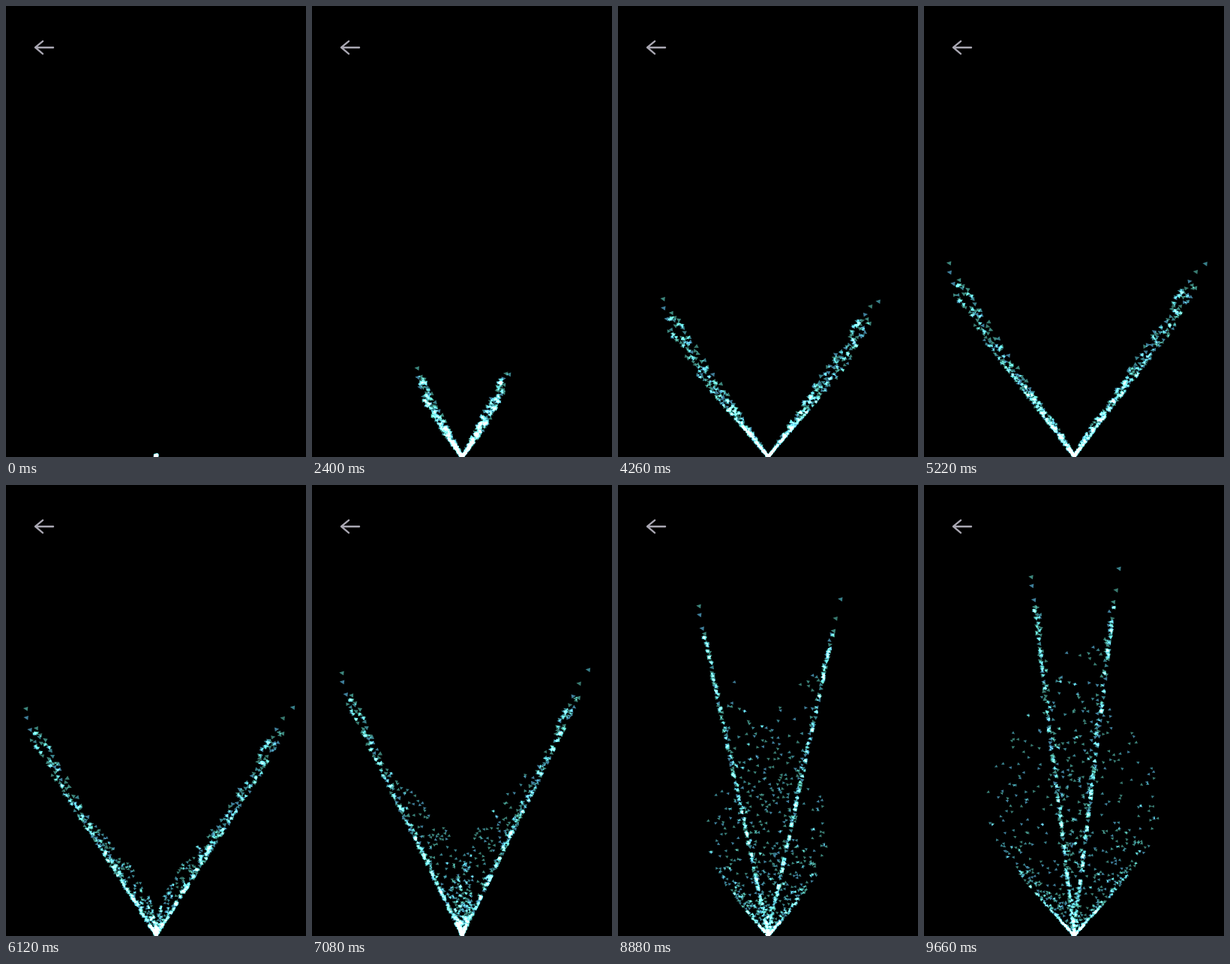
Write an HTML page with a canvas that moves like this. It is 400x600 px and loops after 9720 ms.

```html
<!DOCTYPE html>
<html lang="en">
<head>
<meta charset="utf-8">
<title>Particle fountain</title>
<style>
  html, body { margin: 0; width: 100%; height: 100%; overflow: hidden; background: #000; }
  canvas { display: block; width: 400px; height: 600px; }
</style>
</head>
<body>
<canvas id="stage" width="400" height="600"></canvas>
<script>
const ctx = document.getElementById('stage').getContext('2d');
const LOOP = 9720, TICK = 60;
const BURST_SECONDS = 1.1, BURST_PER_TICK = 18, PER_TICK = 6;
const ORIGIN = { x: 200, y: 600 };
const SWAY = Math.PI / 6;   // angular speed of the shared sideways swing, rad/s
const REACH = 1.757;        // sideways reach per unit of rising speed
const TOP_SPEED = 50;
const COLORS = ['rgb(56,128,138)', 'rgb(60,134,124)', 'rgb(62,126,154)', 'rgb(56,122,112)'];

let seed = 20731;
function random() {
  seed = (Math.imul(seed, 1664525) + 1013904223) >>> 0;
  return seed / 4294967296;
}

function makeParticle(side, born, speed, size, angle) {
  const color = COLORS[Math.floor(random() * COLORS.length)];
  const shape = [[-1, -0.25], [0.95, -0.85], [0.75, 0.9]].map(([x, y]) => [
    size * (x * Math.cos(angle) - y * Math.sin(angle)),
    size * (x * Math.sin(angle) + y * Math.cos(angle))
  ]);
  return { side, born, speed, color, shape };
}

// The fastest early particles that form the two tips: side, birth (s), speed (px/s)
const particles = [
  [-1, 0.016, 49.5], [-1, 0.27, 49.6], [-1, 0.5, 48.8],
  [1, 0.3, 52.2], [1, 0.1, 48.1], [1, 0.67, 49.4]
].map(([side, born, speed]) => makeParticle(side, born, speed, 3.3, 0));

for (let tick = 0; tick < LOOP / TICK; tick++) {
  const born = (tick - 1) * TICK / 1000;
  const count = born < BURST_SECONDS ? BURST_PER_TICK : PER_TICK;
  for (let i = 0; i < count; i++) {
    let speed = TOP_SPEED * random();
    if (speed * (9.66 - born) > 440) speed *= 0.85;
    const size = 2.1 + 1.1 * Math.exp(-Math.max(born, 0) / 1.5);
    const angle = (random() - 0.5) * 1.2 + (random() < 0.3 ? Math.PI : 0);
    particles.push(makeParticle(i % 2 ? 1 : -1, born, speed, size, angle));
  }
}

function drawArrow() {
  ctx.strokeStyle = '#a9a7b2';
  ctx.lineWidth = 2.4;
  ctx.lineCap = ctx.lineJoin = 'round';
  ctx.beginPath();
  ctx.moveTo(63, 55.2);
  ctx.lineTo(39, 55.2);
  ctx.moveTo(49, 46.8);
  ctx.lineTo(39, 55.2);
  ctx.lineTo(49, 63.6);
  ctx.stroke();
}

function drawParticle(p, time) {
  const swing = Math.cos(SWAY * p.born) - Math.cos(SWAY * time);
  const x = ORIGIN.x + p.side * REACH * p.speed * swing;
  const y = ORIGIN.y - p.speed * (time - p.born);
  ctx.fillStyle = p.color;
  ctx.beginPath();
  for (const [dx, dy] of p.shape) ctx.lineTo(x + dx, y + dy);
  ctx.fill();
}

function render(ms) {
  const time = Math.floor((ms % LOOP) / TICK) * TICK / 1000;
  ctx.globalCompositeOperation = 'source-over';
  ctx.fillStyle = '#000';
  ctx.fillRect(0, 0, 400, 600);
  drawArrow();
  ctx.globalCompositeOperation = 'lighter';
  for (const p of particles) {
    if (p.born < time) drawParticle(p, time);
  }
}

let start = null;
function frame(now) {
  if (start === null) start = now;
  render(now - start);
  requestAnimationFrame(frame);
}
render(0);
requestAnimationFrame(frame);
</script>
</body>
</html>
```
